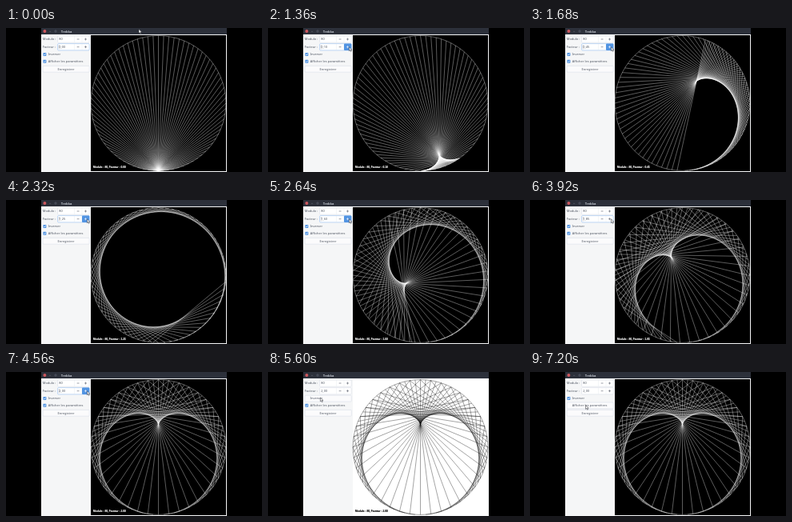
Write an HTML page that moves like this. It is 320 px wide and 180 px high and loops after 8 s.

```html
<!DOCTYPE html>
<html lang="fr">
<head>
<meta charset="utf-8">
<title>Trekka</title>
<style>
  html, body { margin: 0; width: 100%; height: 100%; overflow: hidden; background: #000; }
  svg { display: block; width: 100vw; height: 100vh; }
  text { font: 4px "Noto Sans", sans-serif; fill: #4f5662; white-space: pre; }
  .title { font-weight: 600; fill: #c3c8d1; }
  .caption { font: bold 3.25px "Liberation Sans", Arial, sans-serif; stroke-width: .12; }
  .mid { text-anchor: middle; }
  .field, .button { fill: #fff; stroke: #d3d9e4; stroke-width: .5; }
  .button { fill: #fbfbfc; }
  .sign { fill: none; stroke: #59606c; stroke-width: .6; }
  .tick { fill: none; stroke: #fff; stroke-width: .7; }
  .blue { fill: #5294e2; }
  .split { stroke: #e3e7ee; stroke-width: .4; }
</style>
</head>
<body>
<svg viewBox="0 0 320 180">
  <rect width="320" height="180"/>
  <rect x="44" width="232" height="8" fill="#2c303a"/>
  <circle cx="48.4" cy="3.9" r="2" fill="#cc575d"/>
  <path d="M54 4.4h2.2M61 3h2v2h-2z" fill="none" stroke="#646b79" stroke-width=".5"/>
  <text class="title" x="68.8" y="5.5">Trekka</text>
  <rect x="44" y="8" width="232" height="172" fill="#f5f6f7"/>

  <text x="45.8" y="15.4">Modulo :</text>
  <rect class="field" x="64.6" y="9.9" width="39.6" height="8.3" rx="1"/>
  <path class="split" d="M85.5 10.2v7.7M95 10.2v7.7"/>
  <path class="sign" d="M88.7 14h2.8M98 14h3M99.5 12.5v3"/>
  <text id="modulo" x="66.3" y="15.4"></text>

  <text x="45.8" y="25.1">Facteur :</text>
  <rect class="field" id="entry" x="64.6" y="19.6" width="39.6" height="8.3" rx="1"/>
  <path class="split" d="M85.5 19.9v7.7M95 19.9v7.7"/>
  <rect class="blue" id="press" x="95" y="19.5" width="9.3" height="8.5" rx="1"/>
  <path class="sign" d="M88.7 23.7h2.8"/>
  <path class="sign" id="plus" d="M98 23.7h3M99.5 22.2v3"/>
  <text id="value" x="66.3" y="25.1"></text>
  <path id="caret" d="M66.3 21v5.4" stroke="#3c424d" stroke-width=".25"/>

  <g id="invert">
    <rect class="button" x="46" y="29.2" width="58.3" height="7.8" rx="1"/>
    <g><rect class="blue" x="46.4" y="31" width="4" height="4" rx=".7"/><path class="tick" d="M47.3 33l.9.9 1.5-1.9"/></g>
    <text x="52.6" y="34.4">Inverser</text>
  </g>
  <g id="show">
    <rect class="button" x="46" y="38" width="58.3" height="7.8" rx="1"/>
    <g><rect class="blue" x="46.4" y="39.8" width="4" height="4" rx=".7"/><path class="tick" d="M47.3 41.8l.9.9 1.5-1.9"/></g>
    <text x="52.8" y="43.1">Afficher les paramètres</text>
  </g>
  <rect class="button" x="46" y="47.4" width="58.3" height="7.8" rx="1"/>
  <text class="mid" x="75" y="52.6">Enregistrer</text>

  <rect id="paper" x="106" y="9" width="169" height="170"/>
  <g id="ink" fill="none" stroke-width=".36">
    <circle cx="190.5" cy="94" r="84.4"/>
    <path id="chords"/>
  </g>
  <text class="caption" id="caption" x="109" y="175.3"></text>
  <path id="cursor" d="M0 0v4.8l1.2-1 .8 1.8 .9-.4-.8-1.7h1.5z" fill="#fff" stroke="#22252c" stroke-width=".5"/>
</svg>
<script>
const LOOP = 8000, TICK = 80, MODULO = 80;
const CX = 190.5, CY = 94, R = 84.4;
const CLICKS = [3120, 3360, 3520, 3760, 4000, 4240, 4560];
// start, end, from, to
const MOVES = [
  [160, 800, [166, 1.6], [101.4, 23.8]],
  [4800, 5200, [101.4, 23.8], [65.4, 32]],
  [6560, 6880, [65.4, 32], [69.6, 41.6]]
];
const $ = id => document.getElementById(id);
const within = (t, a, b) => t >= a && t < b;
const toggle = (el, on) => el.setAttribute('visibility', on ? 'visible' : 'hidden');

function factorAt(t) {
  if (t < 1040) return 0;
  if (t < 1360) return .05;
  const held = Math.min(33, Math.floor(1.9 * (t - 1360) / TICK + 2.35));
  return (held + CLICKS.filter(c => c <= t).length) / 20;
}

function cursorAt(t) {
  let pos = MOVES[0][2];
  for (const [start, end, a, b] of MOVES) {
    if (t < start) break;
    const p = Math.min(1, (t - start) / (end - start));
    const e = p * p * (3 - 2 * p);
    pos = a.map((v, i) => v + (b[i] - v) * e);
  }
  return pos;
}

function point(i) {
  const a = 2 * Math.PI * i / MODULO;
  return (CX + R * Math.sin(a)).toFixed(2) + ' ' + (CY + R * Math.cos(a)).toFixed(2);
}

function setCheck(id, on) {
  const [frame, mark] = $(id).children;
  toggle(frame, !on);
  toggle(mark, on);
}

let drawn = -1;
function draw(t) {
  const factor = factorAt(t), label = factor.toFixed(2);
  const dark = !within(t, 5440, 6320), focus = t < 5440;
  const pressed = within(t, 1040, 2720) || CLICKS.some(c => within(t, c, c + TICK));
  const line = dark ? '#fff' : '#000';

  if (factor !== drawn) {
    let d = '';
    for (let i = 0; i < MODULO; i++) d += `M${point(i)}L${point(i * factor)}`;
    $('chords').setAttribute('d', d);
    drawn = factor;
  }
  $('paper').style.fill = dark ? '#000' : '#fff';
  $('ink').style.stroke = $('caption').style.fill = $('caption').style.stroke = line;
  $('caption').textContent = `Modulo : ${MODULO}, Facteur : ${label}`;
  $('value').textContent = label.replace('.', ',');
  toggle($('caption'), t < 7200);
  toggle($('press'), pressed);
  $('plus').style.stroke = pressed ? '#fff' : '#59606c';
  $('entry').style.stroke = focus ? '#7fb0ea' : '#d3d9e4';
  toggle($('caret'), focus && !within(t, 400, 800) && !within(t, 2960, 3120) && !within(t, 4880, 5200));
  setCheck('invert', dark);
  setCheck('show', t < 7200);
  $('cursor').setAttribute('transform', `translate(${cursorAt(t)})`);
}

$('modulo').textContent = MODULO;
const start = performance.now();
function loop() {
  const t = (performance.now() - start) % LOOP;
  draw(Math.floor(t / TICK) * TICK);
  requestAnimationFrame(loop);
}
loop();
</script>
</body>
</html>
```
